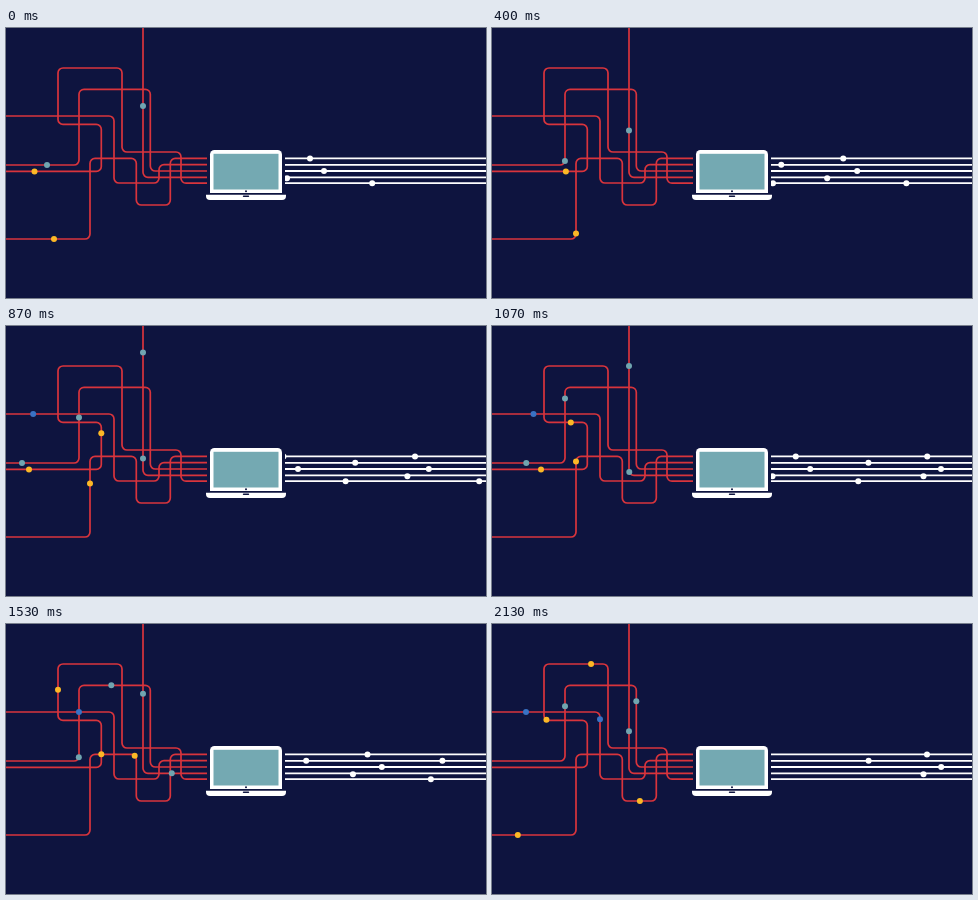
Write an HTML page that moves like this. It is 480 by 270 pixels and loops after 2190 ms.

```html
<!DOCTYPE html>
<html lang="en">
<head>
<meta charset="utf-8">
<title>Data flow</title>
<style>
  html, body { margin: 0; width: 100%; height: 100%; overflow: hidden; background: #0e143f; }
  svg { display: block; width: 100vw; height: 100vh; }
  .wire { fill: none; stroke: #d9343c; stroke-width: 1.7; }
  .beam { stroke: #fff; stroke-width: 1.8; }
</style>
</head>
<body>
<svg viewBox="0 0 480 270">
  <clipPath id="inSide"><rect width="201" height="270"/></clipPath>
  <clipPath id="outSide"><rect x="279" width="201" height="270"/></clipPath>
  <g id="in" clip-path="url(#inSide)"></g>
  <g id="out" clip-path="url(#outSide)"></g>
  <g id="laptop">
    <path fill="#fff" d="M204 165V126.500a4.500 4.500 0 0 1 4.500-4.500h63a4.500 4.500 0 0 1 4.500 4.500V165z"/>
    <rect x="207.500" y="125.800" width="65" height="35.700" fill="#74a9b2"/>
    <circle cx="240" cy="163.200" r="1" fill="#0e143f"/>
    <path fill="#fff" d="M200 166.700h80v1.300a4 4 0 0 1-4 4h-72a4 4 0 0 1-4-4z"/>
    <rect x="236.800" y="167.500" width="6.400" height="1.500" rx=".7" fill="#0e143f"/>
  </g>
</svg>
<script>
const LOOP = 2190, LEAD = 10, RADIUS = 5;
const TEAL = '#70a5b0', YELLOW = '#fcb826', BLUE = '#3972c4';

// Corner points of each wire; dots are [start distance, speed per step].
const wires = [
  { color: TEAL, points: [[137, -LEAD], [137, 149.3], [212, 149.3]],
    dots: [[78, 2.72], [-27.2, 2.69]] },
  { color: BLUE, points: [[-LEAD, 88], [108, 88], [108, 155], [153, 155], [153, 136.7], [212, 136.7]],
    dots: [[-30, 2.86], [-111, 2.9]] },
  { color: TEAL, points: [[-LEAD, 137], [73, 137], [73, 61.3], [144.3, 61.3], [144.3, 143], [212, 143]],
    dots: [[41, 3.77], [-57.1, 3.655]] },
  { color: YELLOW, points: [[-LEAD, 143.4], [95.3, 143.4], [95.3, 96.4], [52, 96.4], [52, 40], [116, 40],
      [116, 124], [175, 124], [175, 155.2], [212, 155.2]],
    dots: [[28.5, 5.04], [-81, 5.2]] },
  { color: YELLOW, points: [[-LEAD, 211], [84, 211], [84, 130.4], [130.3, 130.4], [130.3, 177], [164.3, 177],
      [164.3, 130.4], [212, 130.4]],
    dots: [[48, 4.37], [-192.7, 4.37]] }
];

// Outgoing lines; dots are [x at start, speed per step].
const beams = [
  { y: 130.4, dots: [[304, 5.25], [172.5, 5.25]] },
  { y: 136.8, dots: [[240.2, 5.45], [103.6, 5.46]] },
  { y: 143, dots: [[318, 5.24], [187.2, 5.24]] },
  { y: 149.3, tilt: 1, dots: [[281, 6.02], [129.5, 6.04]] },
  { y: 155.2, dots: [[366.2, 5.35], [233, 5.33]] }
];

function add(parent, tag, attrs) {
  const el = document.createElementNS('http://www.w3.org/2000/svg', tag);
  for (const name in attrs) el.setAttribute(name, attrs[name]);
  return parent.appendChild(el);
}

function toward([x, y], [tx, ty]) {
  const f = RADIUS / Math.hypot(tx - x, ty - y);
  return [x + (tx - x) * f, y + (ty - y) * f];
}

function roundedPath(points) {
  let d = 'M' + points[0];
  for (let i = 1; i < points.length - 1; i++) {
    const [prev, here, next] = points.slice(i - 1, i + 2);
    const a = toward(here, prev), b = toward(here, next);
    const turn = (a[0] - here[0]) * (b[1] - here[1]) - (a[1] - here[1]) * (b[0] - here[0]);
    d += `L${a}A${RADIUS} ${RADIUS} 0 0 ${turn < 0 ? 1 : 0} ${b}`;
  }
  return d + 'L' + points[points.length - 1];
}

const movers = [];
const inGroup = document.getElementById('in'), outGroup = document.getElementById('out');

for (const wire of wires)
  wire.path = add(inGroup, 'path', { class: 'wire', d: roundedPath(wire.points) });

for (const { path, color, dots } of wires) {
  const length = path.getTotalLength();
  for (const [start, speed] of dots) {
    const dot = add(inGroup, 'circle', { r: 3, fill: color });
    movers.push(step => {
      const s = start + speed * step + LEAD;
      const p = path.getPointAtLength(Math.max(0, Math.min(length, s)));
      dot.setAttribute('cx', p.x);
      dot.setAttribute('cy', p.y);
    });
  }
}

for (const { y, tilt = 0, dots } of beams) {
  add(outGroup, 'path', { class: 'beam', d: `M279 ${y}H480` });
  for (const [start, speed] of dots) {
    const dot = add(outGroup, 'circle', { r: 3, cy: y + tilt, fill: '#fff' });
    movers.push(step => dot.setAttribute('cx', start + speed * step));
  }
}

// Fifteen pictures a second, each starting on a multiple of 10 ms.
function pictureAt(t) {
  let k = Math.ceil(t * 0.015);
  while (Math.round(k * 20 / 3) * 10 > t) k--;
  return Math.min(k, 32);
}

function draw() {
  const k = pictureAt(performance.now() % LOOP);
  const step = Math.floor(k * 25 / 16 + 0.4);
  for (const move of movers) move(step);
  requestAnimationFrame(draw);
}
draw();
</script>
</body>
</html>
```
